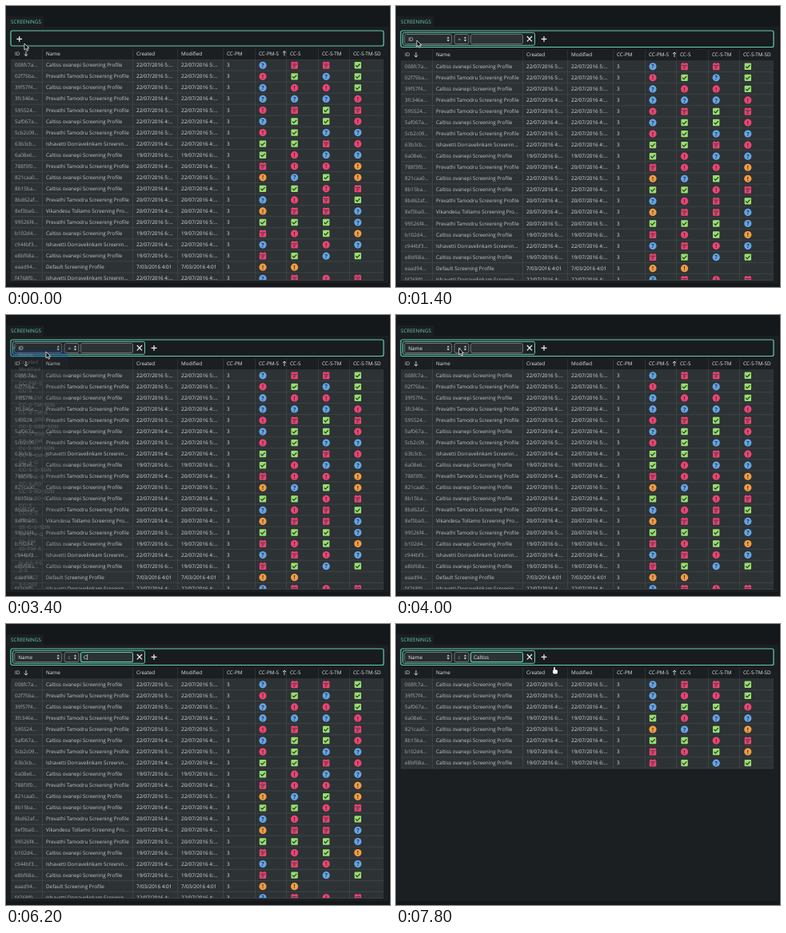
These frames come from a looping animation (480 px wide and 352 px high, 8000 ms). An HTML page with a canvas:

```html
<!DOCTYPE html>
<html lang="en">
<head>
<meta charset="utf-8">
<title>Screenings filter</title>
<style>
html, body { margin: 0; width: 100%; height: 100%; overflow: hidden; background: #14181b; }
canvas { display: block; width: 480px; height: 352px; }
</style>
</head>
<body>
<canvas id="stage" width="480" height="352"></canvas>
<script>
const ctx = document.getElementById('stage').getContext('2d');
ctx.textRendering = 'geometricPrecision';

const LOOP = 8000, STEP = 200;
const TEAL = '#66cdb2', PANEL = '#1b1f22', CELL = '#2d3235', LINE = '#42474a', BLUE = '#0c62d4';
const SANS = '"Open Sans", "Noto Sans", sans-serif', UI = 'Inter, Roboto, sans-serif';
const QUERY = 'Caltiss';
const PEOPLE = {
  C: 'Caltiss ovanepi Screening Profile',
  S: 'Prevathi Tamodru Screening Profile',
  A: 'Ishavetti Dorravelinkam Screenin...',
  R: 'Vikandesu Tollamo Screening Pro...',
  D: 'Default Screening Profile'
};

// id, person, day, hour, icons: q question, x alert, o warning, c calendar, k check
const ROWS = `008fc7a C 22 5 qcck
02f75ba S 22 5 xkqk
39f57f4 C 22 5 qxxk
3fc346e S 22 4 qqqx
595524 S 22 5 xckc
5af067a C 22 4 qkkx
5cb2c09 S 22 5 xkqq
63b3cb A 22 4 kkcx
6a08e6 C 19 6 kxqq
788f3f0 S 20 4 cxxo
821caa0 C 22 5 oqko
8b15ba C 22 4 kkxc
8bd62af S 20 4 qxck
8ef3ba0 R 20 4 occq
99526f4 S 20 5 kkkq
b102d4 C 19 6 cxko
c944bf3 A 22 4 qcxq
e8bf68a C 19 6 ckqk
eaad94 D 0 0 oo
f4768f0 A 22 4 qcxc`.split('\n').map(line => {
  const [id, who, day, hour, icons] = line.split(' ');
  const date = day === '0' ? '7/03/2016 4:01' : `${day}/07/2016 ${hour}:...`;
  return { id: id + '...', name: PEOPLE[who], date, icons };
});

const HEADERS = [['ID', 11], ['Name', 50], ['Created', 163], ['Modified', 219], ['CC-PM', 276],
  ['CC-PM-S', 316], ['CC-S', 355], ['CC-S-TM', 395], ['CC-S-TM-SD', 434]];
const DIVIDERS = [45.5, 158.5, 214.5, 271.5, 311.5, 350.5, 390.5, 429.5];
const FIELDS = ('ID Name Created Modified CC-PM CC-PM-S CC-S CC-S-TM CC-S-TM-SDN CC-S-TM-G CC-S-GBO ' +
  'CC-S-GBO-SDN CC-S-GBO-G CC-S-SM Cc-S-SM-SDN CC-S-SM-G CC-S-O CC-S-O-SDN CC-S-O-G CC-S-RO ' +
  'CC-S-RO-SDN CC-S-RO-G CC-S CC-U-S SS-C-S SS-C-S-SDN SS-C-S-G SS-PM SS-PM-S P-V-S N-AIS-PS Z-S ' +
  'S-I-DET S-I-DEF').split(' ');

// time, x, y of the pointer tip
const POINTER = [[0, 23, 47], [600, 15, 41], [1200, 16, 41], [1400, 26, 43], [2000, 38, 42],
  [2400, 38, 42], [3200, 50, 46], [3400, 50, 46], [4200, 84, 41], [4400, 85, 42], [4600, 89, 55],
  [4800, 90, 56], [5400, 118, 42], [7200, 120, 44], [7800, 197, 54]];

function pointerAt(t) {
  const i = POINTER.findIndex(p => p[0] >= t);
  if (i < 1) return POINTER[0].slice(1);
  const [t0, x0, y0] = POINTER[i - 1], [t1, x1, y1] = POINTER[i];
  const k = (t - t0) / (t1 - t0), ease = k * k * (3 - 2 * k);
  return [x0 + (x1 - x0) * ease, y0 + (y1 - y0) * ease];
}

function rect(x, y, w, h, color) {
  ctx.fillStyle = color;
  ctx.fillRect(x, y, w, h);
}

function box(x, y, w, h, radius, fill, stroke, width = 1) {
  ctx.beginPath();
  ctx.roundRect(x, y, w, h, radius);
  if (fill) { ctx.fillStyle = fill; ctx.fill(); }
  if (stroke) { ctx.strokeStyle = stroke; ctx.lineWidth = width; ctx.stroke(); }
}

// Each path is a flat list of x, y pairs.
function lines(color, width, ...paths) {
  ctx.strokeStyle = color;
  ctx.lineWidth = width;
  ctx.beginPath();
  for (const p of paths)
    for (let i = 0; i < p.length; i += 2) ctx[i ? 'lineTo' : 'moveTo'](p[i], p[i + 1]);
  ctx.stroke();
}

function text(str, x, middle, color, font = '6.35px ' + SANS) {
  ctx.font = font;
  ctx.fillStyle = color;
  ctx.fillText(str, x, middle + 2.3);
}

function icon(kind, x, y) {
  const dark = '#2b2f33', pink = '#ee4473';
  if (kind === 'k') {
    box(x - 4.2, y - 4.2, 8.4, 8.4, 1, '#98df6c');
    lines(dark, 1.2, [x - 2.6, y, x - 0.8, y + 1.9, x + 2.7, y - 1.8]);
  } else if (kind === 'c') {
    box(x - 4.2, y - 4, 8.4, 8.4, 1, pink);
    lines(pink, 1.1, [x - 2.3, y - 4.8, x - 2.3, y - 3], [x + 2.3, y - 4.8, x + 2.3, y - 3]);
    lines(dark, 0.8, [x - 3.3, y - 1.4, x + 3.3, y - 1.4], [x - 1.8, y + 0.5, x + 1.8, y + 0.5],
      [x - 1.8, y + 2.4, x + 0.7, y + 2.4]);
  } else {
    ctx.beginPath();
    ctx.arc(x, y, 4.6, 0, 7);
    ctx.fillStyle = { q: '#64a5e8', x: pink, o: '#f39c42' }[kind];
    ctx.fill();
    ctx.textAlign = 'center';
    text(kind === 'q' ? '?' : '!', x, y + 0.3, dark, 'bold 7px ' + SANS);
    ctx.textAlign = 'left';
  }
}

function table(top, rows) {
  const pitch = 14.05, bottom = Math.min(343.5, top + rows.length * pitch);
  const headY = top - 7.5;
  HEADERS.forEach(([label, x]) => text(label, x, headY, '#e6e7e9'));
  lines('#dcdde0', 0.9, [25, headY - 3, 25, headY + 3], [22.7, headY + 0.8, 25, headY + 3, 27.3, headY + 0.8],
    [348, headY + 3, 348, headY - 3], [345.8, headY - 0.8, 348, headY - 3, 350.2, headY - 0.8]);
  DIVIDERS.forEach(x => lines('#34383b', 0.7, [x, headY - 6, x, top]));

  ctx.save();
  ctx.beginPath();
  ctx.rect(6, top, 466, bottom - top);
  ctx.clip();
  rect(6, top, 466, bottom - top, CELL);
  rows.forEach((row, i) => {
    const y = top + 7 + i * pitch;
    lines(LINE, 0.8, [6, y - 7, 472, y - 7]);
    text(row.id, 11, y, '#a8abad');
    text(row.name, 50, y, '#c6c9cb');
    text(row.date, 163, y, '#dfe0e2');
    text(row.date, 219, y, '#dfe0e2');
    text('3', 276, y, '#dfe0e2');
    [...row.icons].forEach((kind, c) => icon(kind, 321 + c * 39.6, y + 0.3));
  });
  DIVIDERS.forEach(x => lines(LINE, 0.8, [x, top, x, bottom]));
  ctx.restore();
  lines(LINE, 0.8, [6, bottom, 472, bottom]);
}

function plus(x) {
  lines('#f2f2f2', 1.2, [x - 3.4, 41.3, x + 3.4, 41.3], [x, 37.9, x, 44.7]);
}

function select(x, w, label, color) {
  box(x, 35.5, w, 12, 2, '#272c2f', '#7b8083', 0.9);
  text(label, x + 4.5, 41.4, color);
  const a = x + w - 4.5;
  ctx.fillStyle = '#e4e5e7';
  ctx.beginPath();
  for (const s of [-1, 1]) {
    ctx.moveTo(a - 1.6, 41.4 + s * 0.8);
    ctx.lineTo(a + 1.6, 41.4 + s * 0.8);
    ctx.lineTo(a, 41.4 + s * 3);
  }
  ctx.fill();
}

function filterBar(t, typed) {
  const open = t >= 1400;
  box(6, 31, 466, open ? 20.5 : 19, 2, '#181c1f', TEAL, 1.2);
  if (!open) return plus(16.7);
  box(8.5, 33.3, 165, 16, 2, '#1d2124', TEAL, 1);
  select(10.7, 59, t < 3600 ? 'ID' : 'Name', '#eeeff0');
  select(73, 18, t < 5000 ? '=' : 'c', t < 5000 ? '#d5d6d8' : '#a0a4a7');
  const focused = t >= 5600;
  box(93.5, 35.5, 65, 12, 2, '#2d3235', focused ? TEAL : '#74797c', focused ? 1.1 : 0.9);
  text(typed, 97, 41.4, '#eeeff0');
  if (focused && t < 7200) {
    const x = 97.6 + ctx.measureText(typed).width;
    lines('#e8e9ea', 0.7, [x, 37.8, x, 45]);
  }
  lines('#f2f2f2', 1.2, [163.8, 38, 170, 44.4], [170, 38, 163.8, 44.4]);
  plus(185);
}

function menu(x, w, items, active, alpha) {
  ctx.save();
  ctx.globalAlpha = alpha;
  box(x, 34, w, items.length * 9 + 3.5, 2, '#2a3036', '#474d52', 0.5);
  rect(x, 35.7 + active * 9, w, 9, BLUE);
  items.forEach((item, i) => text(item, x + 11, 40.2 + i * 9, '#f1f2f4', '600 6.3px ' + UI));
  lines('#fff', 1.1, [x + 3, 40.2, x + 4.8, 42.4, x + 8, 37.7]);
  ctx.restore();
}

function drawPointer(x, y) {
  const shape = [0, 0, 0, 8, 1.9, 6.3, 3.3, 9.2, 4.7, 8.6, 3.4, 5.8, 5.8, 5.8];
  ctx.beginPath();
  for (let i = 0; i < shape.length; i += 2) ctx.lineTo(x + shape[i], y + shape[i + 1]);
  ctx.closePath();
  ctx.fillStyle = '#050505';
  ctx.fill();
  ctx.strokeStyle = '#f4f4f4';
  ctx.lineWidth = 0.8;
  ctx.stroke();
}

function drawHand(x, y) {
  ctx.beginPath();
  ctx.roundRect(x, y, 1.9, 6, 0.9);
  ctx.roundRect(x - 1, y + 3.2, 6, 5.2, 1.6);
  ctx.strokeStyle = '#111';
  ctx.lineWidth = 1;
  ctx.stroke();
  ctx.fillStyle = '#f4f4f4';
  ctx.fill();
}

function draw(t) {
  const typedCount = t < 6200 ? 0 : Math.min(QUERY.length, 1 + Math.floor((t - 6200) / 133));
  const rows = t >= 6800 ? ROWS.filter(row => row.name.startsWith(QUERY)) : ROWS;
  const [x, y] = pointerAt(t);
  const hovered = Math.floor((y - 36) / 9);

  rect(0, 0, 480, 352, '#14181b');
  rect(1, 13, 46, 14, PANEL);
  rect(1, 26, 477, 321, PANEL);
  text('SCREENINGS', 6, 19.5, TEAL);
  table(t < 1400 ? 67 : 68.5, rows);
  filterBar(t, QUERY.slice(0, typedCount));

  // Each menu fades on its last step.
  if (t >= 2400 && t <= 3400) menu(5, 72, FIELDS, hovered, t < 3400 ? 0.97 : 0.2);
  if (t >= 4400 && t <= 4800) menu(68, 29, ['=', '!=', 'c'], hovered, t < 4800 ? 0.97 : 0.6);

  if (t >= 7400) drawHand(x, y);
  else if (t < 6000 || t >= 7200) drawPointer(x, y);
}

function tick() {
  const t = performance.now() % LOOP;
  draw(Math.floor(t / STEP) * STEP);
  requestAnimationFrame(tick);
}
tick();
</script>
</body>
</html>
```
